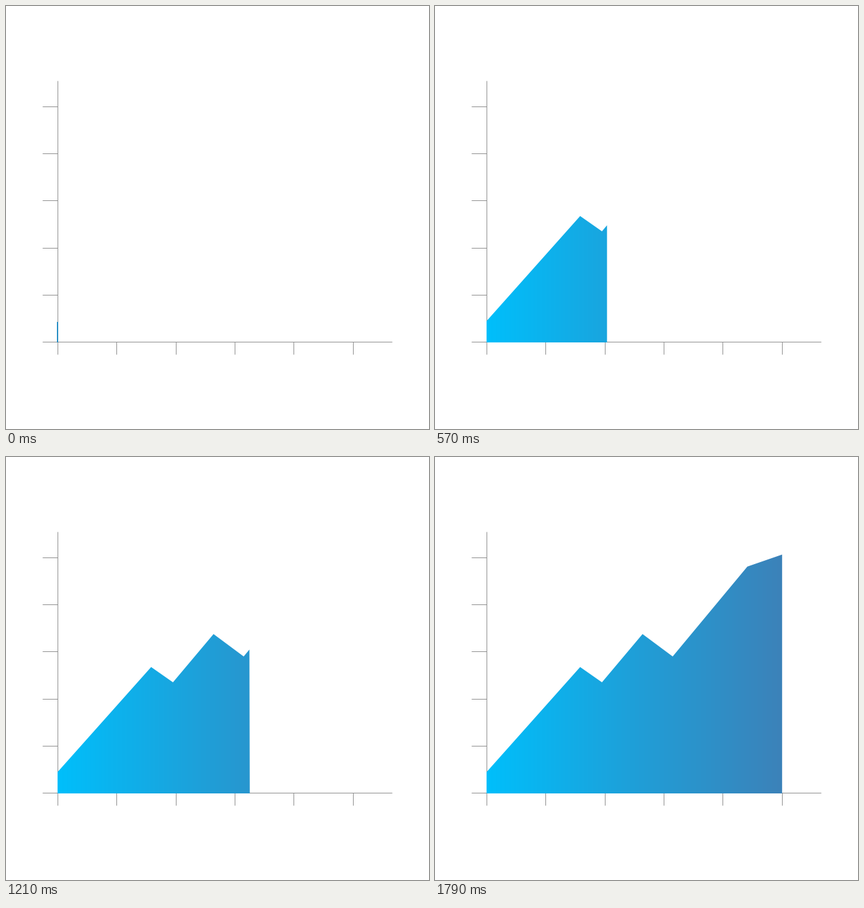
Write a matplotlib script that moves like this. It is 640 by 640 pixels and loops after 4.21 s.

```python
import matplotlib.pyplot as plt
import numpy as np
from matplotlib.animation import FuncAnimation
from matplotlib.collections import LineCollection
from matplotlib.colors import LinearSegmentedColormap
from matplotlib.path import Path

SIZE = 640
LOOP, TICK = 4210, 10       # ms
LEAD = 15                   # ms, keeps step changes clear of the tick edges
STEPS_PER_SECOND = 14
LAST_STEP = 25

LEFT, BASE = 78, 509
CURVE = np.array([(LEFT, 476.7), (219.6, 317.8), (252.6, 340.9), (314, 267.9),
                  (359.6, 301.8), (472.6, 165.8), (525.2, 147.6)])
# steps at which the moving edge reaches each point of the curve
REACHED = [0, 4, 7.4, 12.2, 16.7, 20.75, LAST_STEP]
TOP_LEAN, FOOT_LEAN = 4.4, 11.4     # how far the edge overshoots the shoulder

fig = plt.figure(figsize=(SIZE / 100, SIZE / 100), dpi=100, facecolor="white")
ax = fig.add_axes([0, 0, 1, 1])
ax.axis("off")


def draw_axes(x0=77.8, y0=508.2):
    lines = [[(55, y0), (584, y0)], [(x0, 113), (x0, 527)]]
    for k in range(1, 6):
        x, y = x0 + 89.4 * k, y0 - 71.25 * k
        lines += [[(x, y0), (x, 527)], [(55, y), (x0, y)]]
    ax.add_collection(LineCollection(lines, colors="#929292", linewidths=0.72,
                                     capstyle="butt", zorder=1))


def edge_x(step, lean):
    xs = CURVE[:, 0].copy()
    xs[-2] += lean
    return np.interp(step, REACHED, xs)


def area_points(step):
    x = edge_x(step, TOP_LEAN)
    top = (x, np.interp(x, CURVE[:, 0], CURVE[:, 1]))
    foot = (edge_x(step, FOOT_LEAN), BASE)
    return [*CURVE[CURVE[:, 0] < x], top, foot, (LEFT, BASE), CURVE[0]]


draw_axes()
blues = LinearSegmentedColormap.from_list("blues",
                                          ["#00bffb", "#1f9fd8", "#3c82b9"])
shade = ax.imshow(np.linspace(0, 1, 448)[None, :], cmap=blues, aspect="auto",
                  extent=(LEFT, LEFT + 448, 510, 140),
                  interpolation="nearest", zorder=2)
sliver, = ax.plot([78, 78], [478, 509], color="#2a8fc4", lw=1.44,
                  solid_capstyle="butt", zorder=3)
ax.set_xlim(0, SIZE)
ax.set_ylim(SIZE, 0)


def update(n):
    time = (n * TICK + LEAD) % LOOP
    step = min(LAST_STEP, time * STEPS_PER_SECOND // 1000)
    sliver.set_visible(step == 0)
    shade.set_visible(step > 0)
    shade.set_clip_path(Path(area_points(step)), ax.transData)
    return shade, sliver


anim = FuncAnimation(fig, update, frames=LOOP // TICK, interval=TICK,
                     repeat=True, repeat_delay=0)
plt.show()
```
